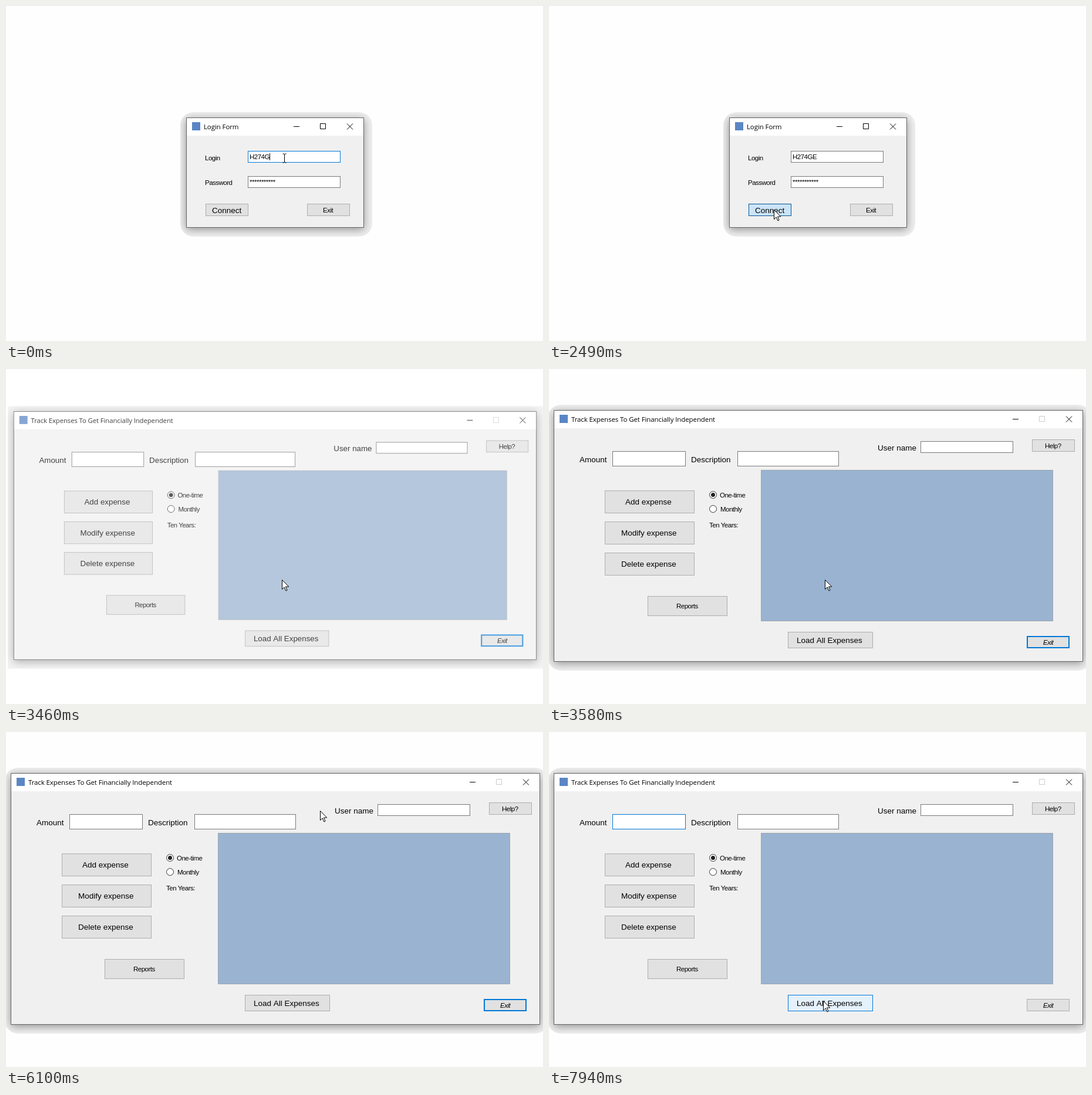
Recreate the animation shown at these times as an HTML page with a canvas. Size 915 px wide and 571 px high, loop 8000 ms.

```html
<!DOCTYPE html>
<html lang="en">
<head>
<meta charset="utf-8">
<title>Expense tracker login</title>
<style>
  html, body { margin: 0; width: 100%; height: 100%; overflow: hidden; background: #fefefe; }
  canvas { display: block; }
</style>
</head>
<body>
<canvas id="stage" width="915" height="571"></canvas>
<script>
const ctx = document.getElementById('stage').getContext('2d');
const LOOP = 8000;
const BLUE = '#0078d7', GREY = '#7a7a7a';

// Text styles: font, letter spacing, baseline offset below the vertical middle
const SMALL = ['11.5px "Liberation Sans", Arial, sans-serif', '-0.5px', 4];
const ITALIC = ['italic ' + SMALL[0], '-0.5px', 4];
const LARGE = ['13.5px "Liberation Sans", Arial, sans-serif', '0px', 5];
const SYSTEM = ['11.5px "Open Sans", "Noto Sans", sans-serif', '-0.1px', 4];

const BUTTON = {
  normal: ['#e1e1e1', '#adadad', 1],
  focus: ['#e1e1e1', BLUE, 2],
  hover: ['#e5f1fb', BLUE, 1],
  pressed: ['#cce4f7', '#005499', 1]
};

// Pointer stops: time, x, y, shape. The pointer rests at each until the next.
const pointerStops = [
  [0, 474, 259, 'beam'],
  ...spread(580, 1370, [[468, 265, 'beam'], [452, 279], [428, 302], [404, 326], [388, 342], [383, 347]]),
  ...spread(2660, 3310, [[388, 348], [412, 351], [442, 355], [464, 359], [473, 360, 'beam']]),
  [3460, 470, 359],
  [3860, 471, 360],
  [3990, 472, 361],
  [4450, 474, 361],
  [4600, 476, 361],
  ...spread(6100, 7090, [[535, 134], [440, 139], [310, 146], [190, 153, 'beam'],
    [110, 157, 'beam'], [85, 157], [98, 155], [121, 153, 'beam']]),
  ...spread(7220, 7940, [[135, 170], [210, 270], [335, 392], [430, 465], [463, 479], [467, 458]])
];

function spread(from, to, points) {
  return points.map((p, i) => [from + (to - from) * i / (points.length - 1), ...p]);
}

function text(str, x, middle, [font, spacing, drop], color = '#000') {
  ctx.font = font;
  ctx.letterSpacing = spacing;
  ctx.fillStyle = color;
  ctx.fillText(str, x, middle + drop);
}

function box(x, y, w, h, fill, border, line = 1) {
  ctx.fillStyle = border;
  ctx.fillRect(x, y, w, h);
  ctx.fillStyle = fill;
  ctx.fillRect(x + line, y + line, w - 2 * line, h - 2 * line);
}

function button(x, y, w, h, label, labelX, style, state = 'normal') {
  box(x, y, w, h, ...BUTTON[state]);
  text(label, labelX, y + Math.floor(h / 2) + (h < 25 ? 1 : 0), style);
}

function field(x, y, w, h, focused) {
  box(x, y, w, h, '#fff', focused ? BLUE : GREY);
}

function caret(x, y, h) {
  ctx.fillStyle = '#000';
  ctx.fillRect(x, y, 1, h);
}

function strokePath(d, color = '#000') {
  ctx.strokeStyle = color;
  ctx.lineWidth = 1;
  ctx.stroke(new Path2D(d));
}

function shadow(x, y, w, h, radius, left, top, right, bottom) {
  ctx.save();
  ctx.beginPath();
  ctx.roundRect(x - left, y - top, w + left + right, h + top + bottom, radius);
  ctx.fillStyle = 'rgba(0,0,0,.06)';
  ctx.fill();
  ctx.clip();
  ctx.shadowColor = 'rgba(0,0,0,.4)';
  ctx.shadowBlur = 14;
  ctx.shadowOffsetY = 3;
  ctx.fillStyle = '#646464';
  ctx.fillRect(x, y, w, h);
  ctx.restore();
}

function appWindow(x, y, w, h, title, { controls = true, maxColor = '#000', radius = 22 } = {}) {
  shadow(x, y, w, h, radius, 10, 9, 14, 15);
  box(x, y, w, h, '#f0f0f0', '#646464');
  ctx.fillStyle = '#fff';
  ctx.fillRect(x + 1, y + 1, w - 2, 30);
  ctx.fillStyle = '#5b86c4';
  ctx.fillRect(x + 10, y + 8, 14, 14);
  text(title, x + 30, y + 16, SYSTEM);
  if (!controls) return;
  const right = x + w, mid = y + 15.5;
  strokePath(`M${right - 120} ${mid}h10`);
  strokePath(`M${right - 74.5} ${mid - 5}h9v9h-9z`, maxColor);
  strokePath(`M${right - 29} ${mid - 5}l10 10m0 -10l-10 10`);
}

function messageBox(okState) {
  shadow(402, 249, 130, 133, 22, 15, 15, 15, 16);
  box(402, 249, 130, 133, '#fff', '#646464');
  ctx.fillStyle = '#f0f0f0';
  ctx.fillRect(403, 339, 128, 42);
  text('Successful login!', 414, 310, SYSTEM);
  button(442, 349, 73, 21, 'OK', 471, SYSTEM, okState);
}

function loginScene(t, pointerX) {
  const clicked = t >= 2340, message = t >= 2500;
  appWindow(307, 190, 303, 188, 'Login Form', { controls: !message });
  text('Login', 339, 259, SMALL);
  text('Password', 339, 301, SMALL);
  field(412, 247, 158, 20, !clicked);
  field(412, 290, 158, 20);
  text(t < 140 ? 'H274G' : 'H274GE', 415, 257, SMALL);
  text('*'.repeat(11), 415, 300, SMALL);
  if (t < 740) caret(t < 140 ? 449 : 456, 251, 12);

  const connect = message ? 'focus' : clicked ? 'pressed' : t >= 1054 ? 'hover' : 'normal';
  button(340, 337, 73, 21, 'Connect', 351, LARGE, connect);
  button(513, 337, 73, 21, 'Exit', 540, SMALL);

  if (message) {
    ctx.globalAlpha = t < 2660 ? 0.6 : 1;
    messageBox(pointerX >= 442 ? 'hover' : 'focus');
    ctx.globalAlpha = 1;
  }
}

function radio(y, label, x, checked) {
  ctx.beginPath();
  ctx.arc(279.5, y, 6, 0, 7);
  ctx.fillStyle = '#fff';
  ctx.fill();
  ctx.strokeStyle = '#333';
  ctx.lineWidth = 1;
  ctx.stroke();
  if (checked) {
    ctx.beginPath();
    ctx.arc(279.5, y, 3.5, 0, 7);
    ctx.fillStyle = '#222';
    ctx.fill();
  }
  text(label, x, Math.round(y), SMALL);
}

function expenseScene(t) {
  const opening = t < 3580, amountFocus = t >= 7090;
  ctx.save();
  if (opening) {
    ctx.translate(458.5, 284);
    ctx.scale(0.988, 0.988);
    ctx.translate(-459, -284.5);
  }
  appWindow(8, 70, 902, 429, 'Track Expenses To Get Financially Independent',
    { maxColor: '#ccc', radius: opening ? 0 : 22 });

  text('Amount', 52, 154, LARGE);
  field(108, 140, 125, 26, amountFocus);
  if (amountFocus && t < 7500) caret(111, 143, 16);
  text('Description', 242, 154, LARGE);
  field(321, 140, 173, 26);
  text('User name', 560, 134, LARGE);
  field(633, 123, 158, 20);
  button(823, 120, 73, 21, 'Help?', 845, SMALL);

  button(95, 207, 153, 39, 'Add expense', 130, LARGE);
  button(95, 260, 153, 39, 'Modify expense', 123, LARGE);
  button(95, 313, 153, 39, 'Delete expense', 123, LARGE);
  button(168, 387, 136, 34, 'Reports', 217, SMALL);

  radio(214.5, 'One-time', 291, true);
  radio(238.5, 'Monthly', 292, false);
  text('Ten Years:', 273, 266, SMALL);

  box(361, 172, 498, 258, '#99b3d1', '#a0a8b0');
  button(407, 448, 145, 28, 'Load All Expenses', 422, LARGE, t >= 7652 && (t < 7796 || t >= 7940) ? 'hover' : 'normal');
  button(814, 455, 73, 21, 'Exit', 842, ITALIC, amountFocus ? 'normal' : 'focus');
  ctx.restore();

  if (opening) {
    ctx.fillStyle = 'rgba(255,255,255,.26)';
    ctx.fillRect(0, 0, 915, 571);
  }
}

function pointer(x, y, shape) {
  ctx.save();
  ctx.translate(x + 0.5, y + 0.5);
  if (shape === 'beam') {
    strokePath('M-3 -7.5h2l1 1l1 -1h2M0 -6.5v13M-3 7.5h2l1 -1l1 1h2');
  } else {
    const d = 'M0 0V16L3.7 12.4L6.4 18.5L8.6 17.5L6 11.5H11.3Z';
    ctx.fillStyle = '#fff';
    ctx.fill(new Path2D(d));
    strokePath(d);
  }
  ctx.restore();
}

function draw(t) {
  const [, x, y, shape] = pointerStops.findLast(stop => stop[0] <= t);
  ctx.fillStyle = '#fefefe';
  ctx.fillRect(0, 0, 915, 571);
  if (t < 3460) loginScene(t, x);
  else expenseScene(t);
  pointer(x, y, shape);
}

const start = performance.now();
function tick() {
  draw((performance.now() - start) % LOOP);
  requestAnimationFrame(tick);
}
tick();
</script>
</body>
</html>
```
